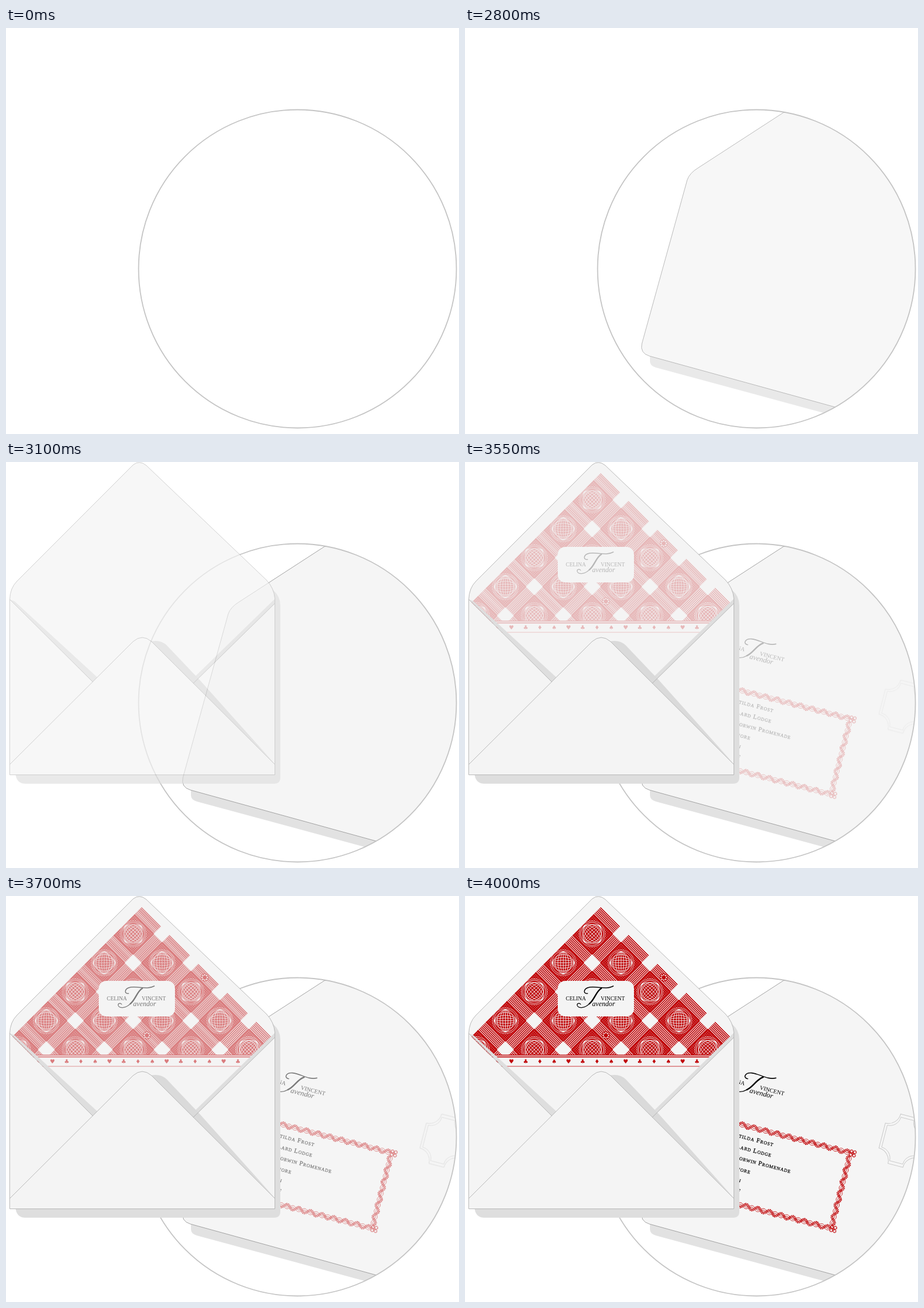
Recreate the animation shown at these times as an HTML page. Size 791 px wide and 708 px high, loop 9 s.

```html
<!DOCTYPE html>
<html lang="en">
<head>
<meta charset="utf-8">
<title>Envelopes</title>
<style>
html, body { margin: 0; width: 100%; height: 100%; overflow: hidden; background: #fff; }
svg { display: block; }
.caps { font: 9.6px "Liberation Serif", serif; }
.script { font: italic 12.2px "Liberation Serif", serif; }
.address { font: 11px "Liberation Serif", serif; font-variant: small-caps; letter-spacing: .8px; }
.suit { font: 10px "DejaVu Sans", sans-serif; text-anchor: middle; }
</style>
</head>
<body>
<svg width="791" height="708" viewBox="0 0 791 708" fill="none">
  <defs>
    <clipPath id="lens"><circle cx="509" cy="420" r="277.5"/></clipPath>
    <clipPath id="liner"><path d="M237 19L11 245L152 385H327L465 247Z"/></clipPath>
    <clipPath id="weave"><path d="M237 19L0 256V277H470V252Z"/></clipPath>
    <pattern id="dots" width="3" height="3" patternUnits="userSpaceOnUse">
      <rect width="3" height="3" fill="#c00508"/>
      <circle cx="1.5" cy="1.5" r=".6" fill="#f4f4f4"/>
    </pattern>
    <rect id="tile" x="-25.2" y="-25.2" width="50.4" height="50.4" fill="url(#dots)" stroke="#c00508"/>
    <g id="globe" stroke="#f4f4f4" stroke-width=".9">
      <circle r="22.5" fill="#c00508" stroke-width=".7"/>
      <circle r="20"/>
      <g id="ribs">
        <path d="M0 -20V20"/>
        <ellipse rx="4.6" ry="19.8"/><ellipse rx="9.4" ry="19.4"/><ellipse rx="14.4" ry="18.4"/>
      </g>
      <use href="#ribs" transform="rotate(90)"/>
    </g>
    <g id="stripes">
      <rect x="-25.2" y="-10.5" width="50.4" height="21" fill="#f4f4f4"/>
      <path stroke="#c00508" stroke-width="1.7"
        d="M-25.2 -9.8h50.4m-50.4 2.8h50.4m-50.4 2.8h50.4m-50.4 2.8h50.4m-50.4 2.8h50.4m-50.4 2.8h50.4m-50.4 2.8h50.4m-50.4 2.8h50.4"/>
    </g>
    <g id="crest" fill="#000">
      <text class="caps" x="176" y="182">CELINA</text>
      <text class="caps" x="237" y="182">VINCENT</text>
      <text class="script" x="222" y="191.5">avendor</text>
      <g fill="none" stroke="#000" stroke-linecap="round">
        <path stroke-width="1.5" d="M214 170C206 171 206 161 218 159C232 157 246 164 259 157"/>
        <path stroke-width="2.4" d="M238 161C229 166 226 181 217 188"/>
        <path stroke-width="1.2" d="M217 188C210 195 199 197 196 191C195 187 200 186 202 189"/>
      </g>
    </g>
    <path id="plaque" d="M0 0A22 22 0 0 0 22 -22H49A22 22 0 0 0 71 0V45A22 22 0 0 0 49 67H22A22 22 0 0 0 0 45Z"/>
  </defs>

  <g clip-path="url(#lens)">
    <g id="back">
      <path fill="#e2e2e2" d="M323 572V581Q323 589 333 592L640 675L660 660Z"/>
      <path fill="#f5f5f5" stroke="#999" stroke-width=".9"
        d="M556 147.5L407 244Q392 253 388 265L309 550Q305 567 322 572L646 661L830 711V147.5L556 147.5"/>
    </g>
    <g id="backArt">
      <use href="#crest" transform="translate(514 337) rotate(14.5) scale(1.05) translate(-237 -182)"/>
      <g id="address" class="address" fill="#000" stroke="#000" stroke-width=".25"
        transform="translate(462 417) rotate(14.5)"></g>
      <g id="braid" transform="translate(677 449) rotate(14.5)" stroke="#c00508"></g>
      <g transform="translate(734 396) rotate(14.5)" stroke="#c8c8c8">
        <use href="#plaque"/>
        <use href="#plaque" transform="translate(35.5 22.5) scale(.88) translate(-35.5 -22.5)"/>
      </g>
    </g>
  </g>
  <circle cx="509" cy="420" r="277.5" stroke="#c4c4c4" stroke-width="1.8"/>

  <g id="front">
    <path fill="#dedede" d="M17 540V547Q20 561 34 561H468Q479 561 479 550V250Q479 234 466 223Z"/>
    <path fill="#f4f4f4" stroke="#b0b0b0" stroke-width=".9"
      d="M6.5 545.5V240Q7 220 19 208L222 5Q233 -4 245 6L455 206Q468 220 469.5 238V545.5Z"/>
    <g id="frontArt" clip-path="url(#liner)">
      <g clip-path="url(#weave)">
        <g id="tiles" transform="translate(222 66) rotate(45)"></g>
        <g id="motifs" fill="#f4f4f4"></g>
      </g>
      <path stroke="#c00508" d="M0 277.5H470M0 280.6H470" stroke-width="1.6"/>
      <path stroke="#c00508" d="M0 297H470" stroke-width=".8"/>
      <g id="suits" class="suit" fill="#c00508"></g>
      <rect x="162" y="148" width="133" height="62" rx="13" fill="#f4f4f4"/>
      <use href="#crest"/>
    </g>
    <path fill="#dedede" d="M8 240L15 243L160 376L152 384ZM469 239V247L327 386L325 379Z"/>
    <path fill="#dadada" d="M252 313Q270 309 281 320L340 382L469 526Z"/>
    <path fill="#f4f4f4" d="M7 527L222 313Q238 299 254 313L469 527V545H7Z"/>
    <g stroke="#b0b0b0" stroke-width=".9">
      <path d="M7 240L152 384M469 247L327 386"/>
      <path d="M7 527L222 313Q238 299 254 313L469 527"/>
    </g>
  </g>
</svg>
<script>
const NS = 'http://www.w3.org/2000/svg';
const $ = id => document.getElementById(id);

function add(parent, tag, attrs, text) {
  const el = document.createElementNS(NS, tag);
  for (const k in attrs) el.setAttribute(k, attrs[k]);
  if (text) el.textContent = text;
  $(parent).appendChild(el);
}

// Woven liner: globes joined by striped bands
const PITCH = 71.4;
function place(href, x, y, turn = 0) {
  add('tiles', 'use', { href, transform: `translate(${x} ${y}) rotate(${turn})` });
}
for (let i = 0; i < 6; i++) {
  for (let j = 0; i + j < 6; j++) {
    const x = i * PITCH, y = j * PITCH;
    place('#stripes', x, y - PITCH / 2);
    place('#stripes', x - PITCH / 2, y, 90);
    place('#tile', x, y);
    place('#globe', x, y, (i + j) % 2 * 45);
  }
}
for (const [x, y] of [[347, 142], [246, 243]]) {
  add('motifs', 'circle', { cx: x, cy: y, r: 7, fill: '#c00508' });
  for (let k = 0; k < 8; k++) {
    const a = k * Math.PI / 4;
    add('motifs', 'circle', { cx: x + 4.6 * Math.cos(a), cy: y + 4.6 * Math.sin(a), r: 1.2 });
  }
}
for (let k = -1; k < 14; k++) {
  add('suits', 'text', { x: 81 + k * 24.92, y: 292 }, '♥♣♦♠'[(k + 4) % 4]);
}

['Matilda Frost', 'Pellard Lodge', '27 Morwin Promenade', 'Ellamore', 'Tarbon', 'ZJ4 9LF']
  .forEach((line, k) => add('address', 'text', { x: 0, y: k * 18.8 }, line));

// Braided border: a hatched wave with two thin strands crossing it
function wave(length, amp, shift) {
  let d = '';
  for (let x = 0; x <= length; x++) {
    d += (x ? 'L' : 'M') + x + ' ' + (amp * Math.sin(x * Math.PI * 2 / 21) + shift).toFixed(2);
  }
  return d;
}
function rope(length, transform) {
  add('braid', 'path', { d: wave(length, 3.8, 0), transform, 'stroke-width': 4.6, 'stroke-dasharray': '1.4 .8' });
  for (const s of [-1.5, 1.5]) {
    add('braid', 'path', { d: wave(length, -2.6, s), transform, 'stroke-width': .8 });
  }
}
rope(232, 'translate(-5 0) rotate(180)');
rope(232, 'translate(-5 136) rotate(180)');
rope(126, 'translate(-4 5) rotate(90)');
for (const cy of [0, 136]) {
  for (let k = 0; k < 4; k++) {
    const a = (k + .5) * Math.PI / 2;
    add('braid', 'circle', {
      cx: 4.2 * Math.cos(a), cy: cy + 4.2 * Math.sin(a), r: 2.5,
      'stroke-width': 1.8, 'stroke-dasharray': '1.3 .6'
    });
  }
  add('braid', 'circle', { cx: 0, cy, r: 1.2 });
}

// Each layer appears in a few equal steps: [start, number of steps]
const LOOP = 9000, STEP = 150;
const fades = { back: [2500, 4], front: [2950, 3], backArt: [3550, 4], frontArt: [3550, 4] };

function draw(t) {
  for (const id in fades) {
    const [begin, steps] = fades[id];
    const n = Math.floor((t - begin) / STEP) + 1;
    $(id).setAttribute('opacity', Math.max(0, Math.min(steps, n)) / steps);
  }
}

const start = performance.now();
function tick() {
  draw((performance.now() - start) % LOOP);
  requestAnimationFrame(tick);
}
tick();
</script>
</body>
</html>
```
